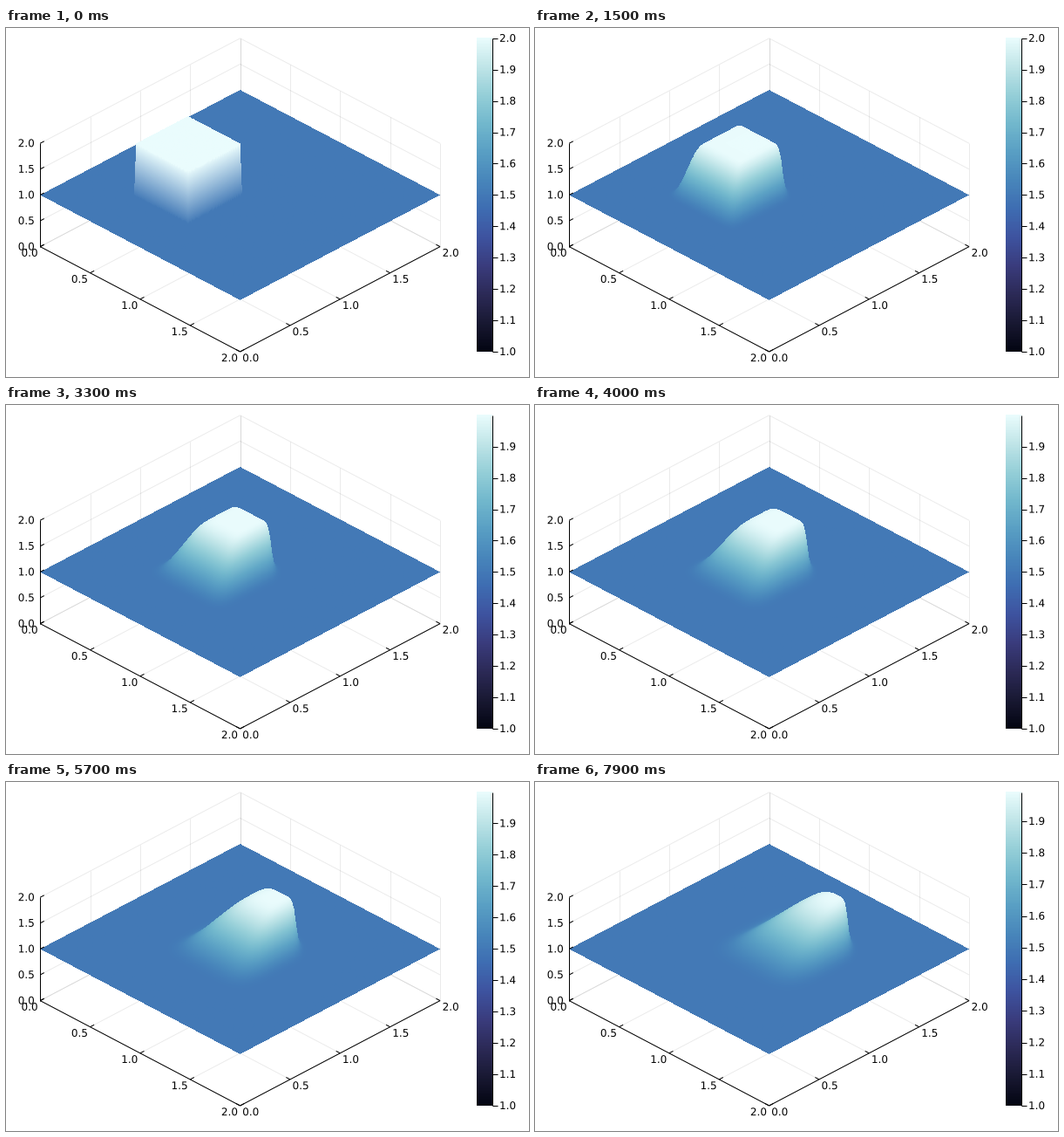
Recreate the animation shown at these times as a matplotlib script. Size 600x400 px, loop 8000 ms.

```python
import numpy as np
import matplotlib as mpl
import matplotlib.pyplot as plt
from matplotlib.animation import FuncAnimation
from matplotlib.patches import PathPatch
from matplotlib.textpath import TextPath
from matplotlib.transforms import Affine2D

mpl.rcParams["font.family"] = "DejaVu Sans"

W, H, DPI = 600, 400, 100
FRAMES, INTERVAL = 80, 100
FONT = 12                       # pixels
LABEL_W = FONT * 1.59           # advance of "0.0"

# Orthographic view: origin and pixels per unit
X0, Y0 = 39.2, 250.6
SX, SY, SZ = 114.7, 60.2, 59.2

# Colour bar box
BAR_L, BAR_R, BAR_T, BAR_B = 540, 558, 11.8, 371

ICE = np.array([
    (3, 5, 18), (25, 25, 51), (44, 42, 87), (58, 60, 125), (62, 83, 160),
    (62, 109, 178), (72, 134, 187), (89, 159, 196), (114, 184, 205),
    (149, 207, 216), (192, 229, 232), (234, 252, 253)]) / 255

# 2D nonlinear convection of a square hat
N = 101
DX = 2 / (N - 1)
CFL = 0.2


def ice(t):
    stops = np.linspace(0, 1, len(ICE))
    return np.stack([np.interp(t, stops, ICE[:, k]) for k in range(3)], axis=-1)


def solve():
    u = np.ones((N, N))
    u[24:51, 24:51] = 2
    states = [u]
    for _ in range(FRAMES - 1):
        n = u.copy()
        c = u[1:, 1:]
        n[1:, 1:] = c - CFL * c * (2 * c - u[:-1, 1:] - u[1:, :-1])
        n[0] = n[-1] = 1
        n[:, 0] = n[:, -1] = 1
        states.append(n)
        u = n
    return states


def triangle(x, y):
    """Vertex ids and weights of the mesh triangle under (x, y)."""
    a, b = np.clip(x, 0, 2) / DX, np.clip(y, 0, 2) / DX
    i = np.minimum(a.astype(int), N - 2)
    j = np.minimum(b.astype(int), N - 2)
    f, g = a - i, b - j
    low = f + g <= 1
    base = i * N + j
    ids = np.where(low, base, base + N + 1), base + N, base + 1
    weights = np.abs(1 - f - g), np.where(low, f, 1 - g), np.where(low, g, 1 - f)
    return ids, weights


def project(x, y, z):
    return X0 + SX * (x + y), Y0 + SY * (x - y) - SZ * z


STATES = solve()

# One ray fan per pixel column, sampled from front to back
cols = np.arange(40, 498)
rows = np.arange(60, 320)
S = (cols + 0.5 - X0) / SX
DEPTH = np.minimum(S, 4 - S)[:, None] * np.linspace(1, -1, 601)
IDS, WTS = triangle((S[:, None] + DEPTH) / 2, (S[:, None] - DEPTH) / 2)


def render(u):
    flat = u.ravel()
    z = sum(w * flat[k] for k, w in zip(IDS, WTS))
    skyline = np.minimum.accumulate(Y0 + SY * DEPTH - SZ * z, axis=1)
    d = np.stack([
        np.interp(rows + 0.5, m[::-1], q[::-1], left=np.nan, right=np.nan)
        for m, q in zip(skyline, DEPTH)], axis=1)
    hit = ~np.isnan(d)
    s = np.broadcast_to(S, d.shape)[hit]
    ids, weights = triangle((s + d[hit]) / 2, (s - d[hit]) / 2)
    shade = ice(flat / 2)
    img = np.zeros(d.shape + (4,))
    img[hit, :3] = sum(w[:, None] * shade[k] for k, w in zip(ids, weights))
    img[hit, 3] = 1
    return np.clip(img, 0, 1)


fig = plt.figure(figsize=(W / DPI, H / DPI), dpi=DPI, facecolor="white")
ax = fig.add_axes([0, 0, 1, 1])
ax.axis("off")
PX = 72 / DPI


def line(p, q, z=3, **style):
    style = {"color": "black", "lw": PX, **style}
    return ax.plot([p[0], q[0]], [p[1], q[1]], zorder=z,
                   solid_capstyle="butt", **style)[0]


def place(patch, x, y):
    flip = Affine2D().scale(1, -1).translate(x, y + 4)
    patch.set_transform(flip + ax.transData)


def label(value, x, y):
    path = TextPath((0, 0), f"{value:.1f}", size=FONT)
    patch = PathPatch(path, facecolor="black", lw=0, zorder=4)
    ax.add_patch(patch)
    place(patch, x, y)
    return patch


def grid(*points):
    for p, q in zip(points, points[1:]):
        line(project(*p), project(*q), z=1, alpha=0.08)


surface = ax.imshow(render(STATES[0]), interpolation="nearest", zorder=2,
                    extent=(cols[0], cols[-1] + 1, rows[-1] + 1, rows[0]))
ax.imshow(ice(np.linspace(1, 0, 256))[:, None], interpolation="nearest",
          aspect="auto", extent=(BAR_L, BAR_R, BAR_B, BAR_T), zorder=2)
ax.set_xlim(0, W)
ax.set_ylim(H, 0)
ax.set_aspect("auto")

# Grid, ticks and labels of the three axes
TICK = 0.04
for v in np.arange(5) / 2:
    grid((v, 0, 0), (v, 2, 0), (v, 2, 2))
    grid((2, v, 0), (0, v, 0), (0, v, 2))
    grid((0, 0, v), (0, 2, v), (2, 2, v))

    px, py = project(v, 0, 0)
    line((px, py), project(v, TICK, 0))
    label(v, px - 2.6 - LABEL_W, py + 7.2)

    px, py = project(2, v, 0)
    line((px, py), project(2 - TICK, v, 0))
    label(v, px + 2.6, py + 7.2)

    px, py = project(0, 0, v)
    line((px, py), project(0, TICK, v))
    label(v, 32.8 - LABEL_W, py)

line(project(0, 0, 0), project(2, 0, 0))
line(project(2, 0, 0), project(2, 2, 0))
line(project(0, 0, 0), project(0, 0, 2))

# Colour bar scale, which follows the falling peak
line((BAR_R, BAR_T), (BAR_R, BAR_B))
LEVELS = 1 + np.arange(11) / 10
marks = [(v, line((BAR_R, 0), (BAR_R + 6, 0)), label(v, 566, 0)) for v in LEVELS]


def update(n):
    u = STATES[n]
    surface.set_data(render(u))
    top = u.max()
    for v, tick, text in marks:
        y = BAR_B - (BAR_B - BAR_T) * (v - 1) / (top - 1)
        shown = v <= top + 1e-9
        tick.set_ydata([y, y])
        tick.set_visible(shown)
        place(text, 566, y)
        text.set_visible(shown)
    return [surface]


anim = FuncAnimation(fig, update, frames=FRAMES, interval=INTERVAL,
                     repeat=True, repeat_delay=0, blit=False)
plt.show()
```
